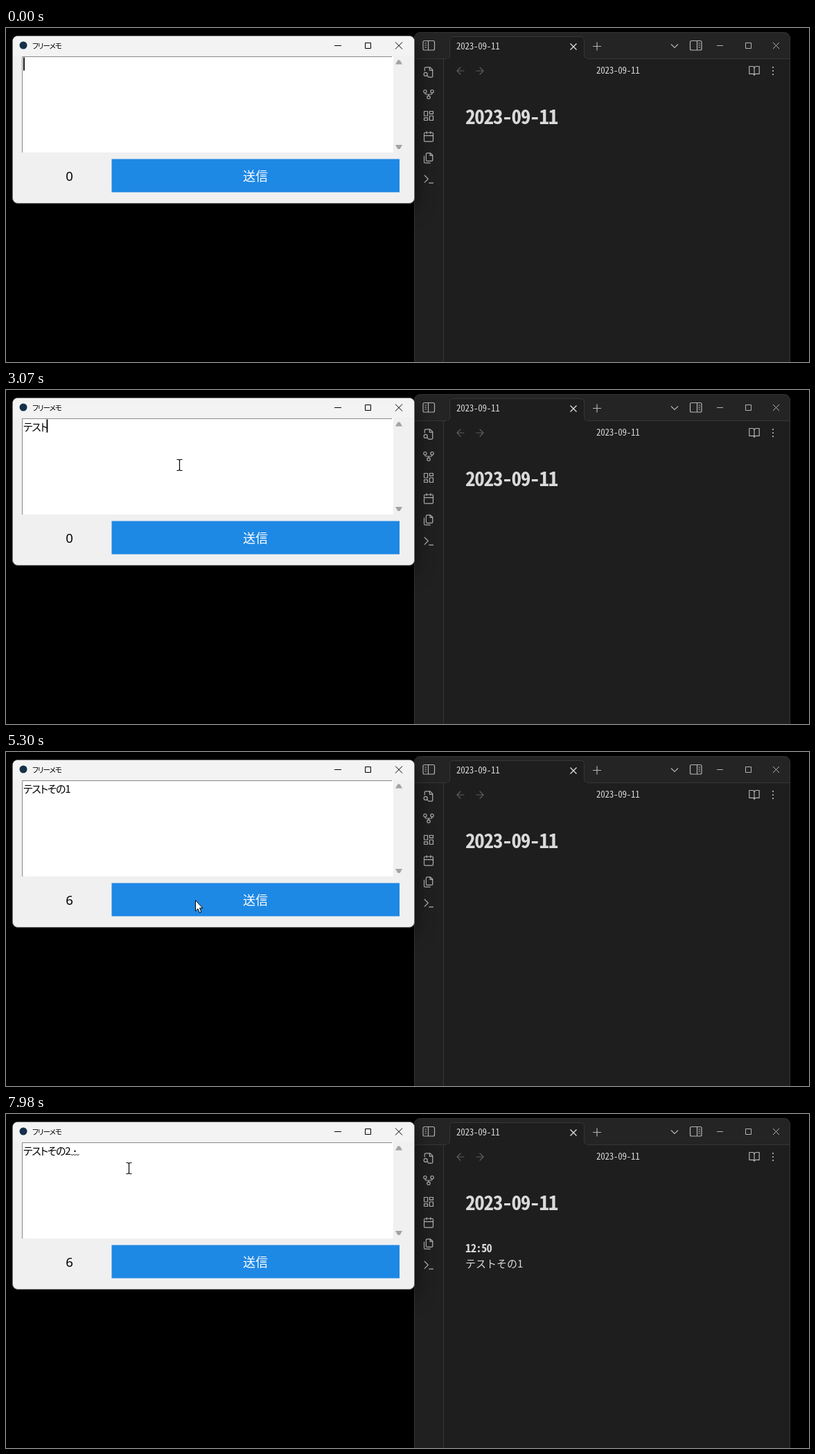
Recreate the animation shown at these times as an HTML page. Size 1159 px wide and 483 px high, loop 8 s.

```html
<!DOCTYPE html>
<html lang="ja">
<head>
<meta charset="utf-8">
<title>フリーメモ</title>
<style>
  html, body { margin: 0; width: 100%; height: 100%; overflow: hidden; background: #000; }
  svg { display: block; font-family: "Noto Sans CJK JP", "Noto Sans CJK", sans-serif; }
  .line { fill: none; stroke-width: 1.2; }
  .icon { vector-effect: non-scaling-stroke; stroke-linecap: round; stroke-linejoin: round; }
  .date { font-family: "Noto Sans Mono CJK JP", "Noto Sans CJK JP", monospace; font-feature-settings: "hwid"; fill: #dadada; }
  .small { font-size: 13px; letter-spacing: -.25px; }
  .heading { font-size: 29px; font-weight: bold; letter-spacing: -1.2px; }
  .time { font-size: 16.5px; font-weight: bold; letter-spacing: -.6px; }
  .title { font-size: 10.5px; letter-spacing: -.9px; font-feature-settings: "palt"; }
  .text { font-size: 15px; letter-spacing: -1.3px; font-feature-settings: "palt"; }
  .raw { font-size: 16px; }
  .dot { font-size: 12px; }
  .label { text-anchor: middle; font-size: 18px; font-weight: 300; }
  #count { font-family: "Noto Sans", sans-serif; font-size: 18.5px; font-weight: 400; }
  #memo { filter: drop-shadow(0 8px 14px #0008); }
</style>
</head>
<body>
<svg width="1159" height="483">
  <!-- notes window -->
  <rect x="589.5" y="6.5" width="542" height="500" rx="8" fill="#242424" stroke="#363636"/>
  <path d="M590 45H631V483H590z" fill="#202020"/>
  <path d="M631 44H1131V483H631z" fill="#1e1e1e"/>
  <path d="M590 44.5H635Q640.5 44.5 640.5 39V18Q640.5 12.5 646 12.5H829Q834.5 12.5 834.5 18V39Q834.5 44.5 840 44.5H1131" fill="#1e1e1e" stroke="#363636"/>
  <path d="M636 44.5H839" stroke="#1e1e1e"/>
  <path d="M631.5 44V483" stroke="#363636"/>
  <g class="line" stroke="#b3b3b3">
    <rect x="602" y="18.5" width="16.5" height="13.5" rx="2"/>
    <path d="M609.5 18.5V32M604.5 22h2.5M604.5 25h2.5M604.5 28h2.5"/>
    <rect x="987.5" y="18.5" width="16.5" height="13.5" rx="2"/>
    <path d="M997.5 18.5V32M999.5 22h2.5M999.5 25h2.5M999.5 28h2.5"/>
    <path d="M814.5 22.5l9 9m0-9l-9 9" stroke="#dadada" stroke-width="1.4"/>
    <path d="M847 26.5h12M853 20.5v12M960 23.5l5 5 5-5"/>
    <path d="M1026 25.5h9M1067.5 21.5h8v8h-8zM1107 21l9 9m0-9l-9 9" stroke-width="1"/>
  </g>
  <g id="icons"></g>
  <text class="date small" x="650" y="31">2023-09-11</text>
  <text class="date small" x="852" y="66">2023-09-11</text>
  <text class="date heading" x="663" y="139">2023-09-11</text>
  <g id="note">
    <text class="date time" x="663" y="200">12:50</text>
    <text x="663" y="222" font-size="15" fill="#dadada">テストその1</text>
  </g>

  <!-- memo window -->
  <g id="memo">
    <rect x="9.5" y="11.5" width="580" height="242" rx="7.5" fill="#f0f0f0" stroke="#777"/>
    <path d="M10 40V19Q10 12 17 12H582Q589 12 589 19V40z" fill="#f3f3f3"/>
  </g>
  <circle cx="25" cy="25" r="5.5" fill="#14304a"/>
  <text class="title" x="38" y="30">フリーメモ</text>
  <g class="line" stroke="#000" style="stroke-width:1">
    <path d="M474 25.5h10M518.5 21.5h8v8h-8zM562 20.5l10 10m0-10l-10 10"/>
  </g>
  <path d="M23 41H559V180H23z" fill="#fff"/>
  <path d="M23.5 180V41.5H557" fill="none" stroke="#8a8a8a"/>
  <path d="M562 52.5h10l-3.5-6h-3zM562 169h10l-3.5 6h-3z" fill="#a3a3a3"/>
  <text id="count" class="label" x="91.5" y="221"></text>
  <rect id="button" x="152.5" y="189.5" width="415.5" height="48" fill="#1e88e5"/>
  <g id="pressed" fill="none">
    <path d="M153.5 237V190.5H567" stroke="#a0a0a0"/>
    <path d="M154.5 236V191.5H566" stroke="#696969"/>
    <path d="M154 236.5H566.5V190" stroke="#fff"/>
  </g>
  <text id="send" class="label">送信</text>

  <text id="committed" class="text" x="25" y="59"></text>
  <text id="composing" y="59"></text>
  <path id="wave" fill="none" stroke="#000" stroke-width=".9"/>
  <rect id="caret" y="42.5" width="1.8" height="19"/>
  <g id="pointer">
    <path id="arrow" d="M.5.5V16L4 12.7 6.4 18.3 8.9 17.2 6.5 11.8H11z" fill="#fff" stroke="#000"/>
    <path id="beam" class="line" d="M-3.5-7.5H-1L.5-6.5 2-7.5H4.5M.5-6.5V7M-3.5 8.5H-1L.5 7.5 2 8.5H4.5" stroke="#000"/>
  </g>
</svg>
<script>
const LOOP = 8000;
const $ = id => document.getElementById(id);
const show = (id, on) => $(id).style.display = on ? '' : 'none';

// [center x, center y, path on a 24-unit grid, colour]
const box = (x, y, w, h) => `M${x} ${y}h${w}v${h}h${-w}z`;
const ring = (x, y, r) => `M${x - r} ${y}a${r} ${r} 0 1 0 ${2 * r} 0a${r} ${r} 0 1 0 ${-2 * r} 0`;
const icons = [
  [610, 64, 'M4 9V4a2 2 0 0 1 2-2h9l5 5v13a2 2 0 0 1-2 2h-6M14 2v6h6M9 18l2 3' + ring(6, 16, 3.5)],
  [610, 96, ring(12, 18, 3) + ring(5, 6, 3) + ring(19, 6, 3) + 'M19 9v1q0 2-2 2H7q-2 0-2-2V9M12 12v3'],
  [610, 127, box(3, 3, 7, 9) + box(14, 3, 7, 5) + box(14, 12, 7, 9) + box(3, 16, 7, 5)],
  [610, 157, 'M5 4h14a2 2 0 0 1 2 2v14a2 2 0 0 1-2 2H5a2 2 0 0 1-2-2V6a2 2 0 0 1 2-2zM16 2v4M8 2v4M3 10h18'],
  [610, 188, 'M15.5 2H9a2 2 0 0 0-2 2v12a2 2 0 0 0 2 2h9a2 2 0 0 0 2-2V6.5zM3 8v12a2 2 0 0 0 2 2h10M15 2v5h5'],
  [610, 219, 'M4 18l7-7-7-7M13 19h8'],
  [656, 62, 'M19 12H5M12 19l-7-7 7-7', '#5c5c5c'],
  [684, 62, 'M5 12h14M12 5l7 7-7 7', '#5c5c5c'],
  [1080, 62, 'M2 3h6a4 4 0 0 1 4 4v14a3 3 0 0 0-3-3H2zM22 3h-6a4 4 0 0 0-4 4v14a3 3 0 0 1 3-3h7z'],
  [1107, 62, ring(12, 5, .7) + ring(12, 12, .7) + ring(12, 19, .7)],
];
$('icons').innerHTML = icons.map(([x, y, d, color = '#b3b3b3']) =>
  `<path class="line icon" stroke="${color}" d="${d}"
    transform="translate(${x} ${y}) scale(.72) translate(-12 -12)"/>`).join('');

// [start ms, committed text, its right edge, text being composed, composing style]
const typing = [
  [0, '', 25],
  [2080, '', 25, 'ｔ', 'raw'],
  [2130, '', 25, 'て', 'raw'],
  [2350, '', 25, 'てｓ', 'raw'],
  [2450, '', 25, 'てす', 'raw'],
  [2560, '', 25, 'てすｔ', 'raw'],
  [2660, '', 25, 'てすと', 'raw'],
  [2940, '', 25, 'テスト', 'text'],
  [3070, 'テスト', 58.5],
  [3140, 'テスト', 58.5, 'ｓ', 'raw'],
  [3200, 'テスト', 58.5, 'そ', 'raw'],
  [3340, 'テスト', 58.5, 'そｎ', 'raw'],
  [3600, 'テスト', 58.5, 'その', 'raw'],
  [3730, 'テスト', 58.5, 'その１', 'raw'],
  [3930, 'テスト', 58.5, 'その1', 'text'],
  [4000, 'テストその1', 92.3],
  [7110, 'テストその', 82.5],
  [7310, 'テストその', 82.5, '２', 'raw'],
  [7440, 'テストその', 82.5, '2', 'text'],
  [7840, 'テストその2', 92.5],
  [7980, 'テストその2', 93.5, '・', 'dot'],
];
const caretOff = [[440, 740], [1340, 1670], [4070, 4400], [5010, 5340], [5920, 6250], [6840, 7160]];

// [first step ms, last step ms, steps, waypoints]
const moves = [
  [130, 470, 6, [[470, 382], [595, 20.5]]],
  [730, 940, 4, [[595, 20.5], [262, 203], [250, 108]]],
  [4400, 4810, 6, [[250, 108], [289, 237]]],
  [4960, 5150, 4, [[289, 237], [273, 214]]],
  [5570, 5710, 3, [[273, 214], [188, 93]]],
  [5850, 6040, 3, [[188, 93], [190, 72]]],
  [6250, 6510, 4, [[190, 72], [177, 78]]],
];

const during = (t, start, end) => t >= start && t < end;
const latest = (list, t) => list.filter(([start]) => t >= start).pop();

function pointerAt(t) {
  const move = latest(moves, t);
  if (!move) return null;
  const [start, end, steps, points] = move;
  const progress = Math.min(1, (t - start) / (end - start));
  const along = (Math.floor(progress * (steps - 1) + 1e-6) + 1) / steps * (points.length - 1);
  const i = Math.min(points.length - 2, Math.floor(along));
  return points[i].map((v, axis) => v + (points[i + 1][axis] - v) * (along - i));
}

function drawText(t) {
  const [, committed, edge, composing = '', style = 'raw'] = latest(typing, t);
  $('committed').textContent = committed;
  const draft = $('composing');
  draft.textContent = composing;
  draft.setAttribute('class', style);
  draft.setAttribute('x', edge);
  const ripples = composing ? Math.round(draft.getComputedTextLength() / 4) : 0;
  $('wave').setAttribute('d', `M${edge} 58` + 'l2 2l2-2'.repeat(ripples));
  $('caret').setAttribute('x', edge);
  show('caret', !composing && !caretOff.some(span => during(t, ...span)));
  $('count').textContent = t < 4000 ? 0 : 6;
}

function drawPointer(t, pressed) {
  const point = pointerAt(t);
  show('pointer', point);
  if (!point) return;
  const [x, y] = point;
  const overText = !pressed && during(x, 23, 559) && during(y, 41, 180);
  $('pointer').setAttribute('transform', `translate(${Math.round(x)} ${Math.round(y)})`);
  show('beam', overText);
  show('arrow', !overText);
}

function draw(t) {
  const pressed = during(t, 5420, 5850);
  drawText(t);
  drawPointer(t, pressed);
  show('button', !pressed);
  show('pressed', pressed);
  show('note', t >= 5970);
  $('send').setAttribute('x', pressed ? 361 : 360);
  $('send').setAttribute('y', pressed ? 222 : 221);
  $('send').setAttribute('fill', pressed ? '#000' : '#fff');
}

const begin = performance.now();
function tick() {
  draw((performance.now() - begin) % LOOP);
  requestAnimationFrame(tick);
}
tick();
</script>
</body>
</html>
```
